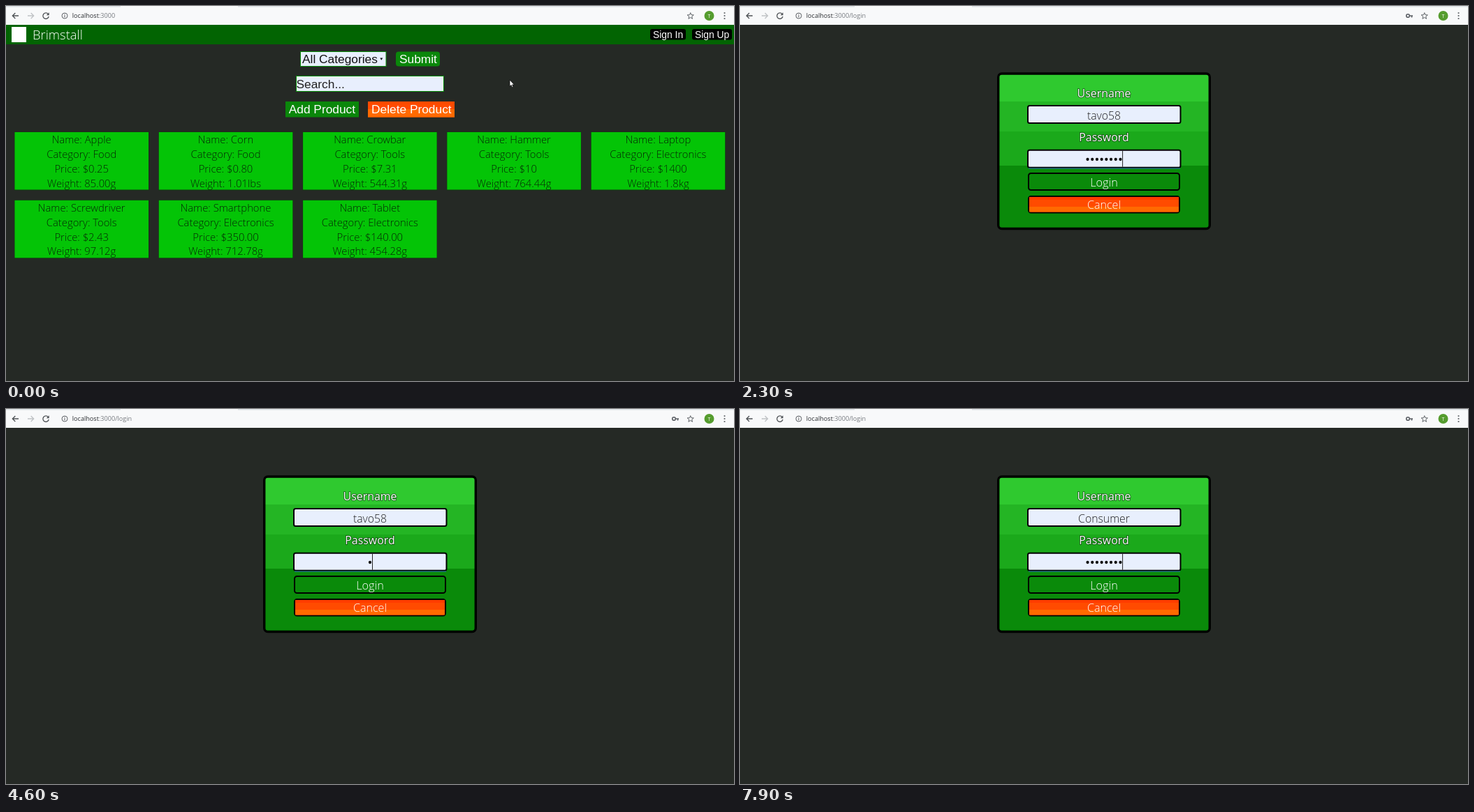
These frames come from a looping animation (1042 by 538 pixels, 8000 ms). An HTML page:

```html
<!DOCTYPE html>
<html lang="en">
<head>
<meta charset="utf-8">
<title>Store login</title>
<style>
  html, body { margin: 0; width: 100%; height: 100%; overflow: hidden; background: #252925; }
  svg { display: block; width: 1042px; height: 538px; }
  text { font-family: "Open Sans", "Noto Sans", sans-serif; white-space: pre; }
  .light { font-weight: 300; }
  .arial { font-family: "Liberation Sans", Arial, sans-serif; }
  .label { stroke: #000; stroke-opacity: .55; stroke-width: 1.6; paint-order: stroke; }
</style>
</head>
<body>
<svg id="stage" viewBox="0 0 1042 538"></svg>
<script>
const LOOP = 8000, STEP = 100;
const USER = "tavo58", BUYER = "Consumer", USERS = [USER, BUYER, "fakename"];
const BLUE = "#e8effd", WHITE = "#f9fafe";

const rect = (x, y, w, h, fill, more = "") =>
  `<rect x="${x}" y="${y}" width="${w}" height="${h}" fill="${fill}" ${more}/>`;
const text = (x, y, size, fill, str, more = "") =>
  `<text x="${x}" y="${y}" font-size="${size}" fill="${fill}" ${more}>${str}</text>`;
const line = (d, color, width, more = "") =>
  `<path d="${d}" fill="none" stroke="${color}" stroke-width="${width}" ${more}/>`;
const disc = (x, y, r, fill) => `<circle cx="${x}" cy="${y}" r="${r}" fill="${fill}"/>`;
const group = (id, body, more = "") => `<g id="${id}" ${more}>${body}</g>`;
const MID = 'text-anchor="middle"';
const LIGHT = 'class="light" text-anchor="middle"';
const ARIAL = 'class="arial"';

function toolbar() {
  const gray = "#5f6368";
  const star = Array.from({ length: 10 }, (_, i) => {
    const a = i * Math.PI / 5 - Math.PI / 2, r = i % 2 ? 2.1 : 4.8;
    return `${(979.7 + r * Math.cos(a)).toFixed(1)},${(14.4 + r * Math.sin(a)).toFixed(1)}`;
  }).join(" ");
  return rect(0, 0, 1042, 27, "#f8f9fa") +
    rect(0, 0, 164, 1.5, "#dee1e6") + rect(332, 0, 710, 1.5, "#dee1e6") +
    line("M18 14H9.5M13.3 10L9.3 14L13.3 18", "#4f5357", 1.3) +
    line("M31 14H39.5M35.7 10L39.7 14L35.7 18", "#bfc2c5", 1.3) +
    group("reload", line("M60.4 11.5A4.2 4.2 0 1 0 61.2 15", "#4f5357", 1.3) +
      `<path d="M61.7 9.3V13.2H57.8Z" fill="#4f5357"/>`) +
    group("stop", line("M53.2 10.2L60.8 17.8M60.8 10.2L53.2 17.8", "#4f5357", 1.3)) +
    `<circle cx="84" cy="14" r="4" fill="none" stroke="${gray}"/>` +
    line("M84 13.3V16.3M84 11.4V12.5", gray, 1.1) +
    `<text x="94.8" y="17.2" font-size="9.1" fill="#2b2e32">localhost<tspan fill="#75797e">:3000<tspan id="path"></tspan></tspan></text>` +
    group("key", `<circle cx="956" cy="14" r="2.3" fill="none" stroke="${gray}" stroke-width="1.6"/>` +
      line("M958 14H963M961.5 14V16.4", gray, 1.7)) +
    `<polygon points="${star}" fill="none" stroke="${gray}" stroke-width="1"/>` +
    disc(1006.5, 14, 7, "#559c2e") + text(1006.5, 16.6, 7, "#fff", "T", MID) +
    [10, 14, 18].map(y => disc(1028.5, y, 1.1, gray)).join("");
}

const PRODUCTS = [
  ["Apple", "Food", "$0.25", "85.00g"], ["Corn", "Food", "$0.80", "1.01lbs"],
  ["Crowbar", "Tools", "$7.31", "544.31g"], ["Hammer", "Tools", "$10", "764.44g"],
  ["Laptop", "Electronics", "$1400", "1.8kg"], ["Screwdriver", "Tools", "$2.43", "97.12g"],
  ["Smartphone", "Electronics", "$350.00", "712.78g"], ["Tablet", "Electronics", "$140.00", "454.28g"]
];

function card(values, i) {
  const x = 12.5 + (i % 5) * 206.3, y = 181 + Math.floor(i / 5) * 97.8;
  const rows = ["Name", "Category", "Price", "Weight"].map((key, k) =>
    text(x + 95.7, y + 16.4 + k * 20.75, 14.8, "#062606", `${key}: ${values[k]}`, LIGHT));
  return rect(x - .5, y - .5, 192.5, 84, "#123a12") + rect(x, y, 191.5, 82.5, "#04c406") + rows.join("");
}

function home() {
  return rect(0, 27, 1042, 28, "#026402") +
    rect(8, 30, 21, 22, "#fff") +
    text(38, 47.8, 18.4, "#fff", "Brimstall", 'class="light"') +
    rect(922, 33, 51, 15.5, "#000", 'rx="3"') + text(926, 45.6, 13.87, "#fff", "Sign In", ARIAL) +
    rect(982, 33, 57, 15.5, "#000", 'rx="3"') + text(986, 45.6, 13.87, "#fff", "Sign Up", ARIAL) +
    rect(921.5, 32, 52, 16.5, "none", 'id="signFocus" stroke="#4a87c8" rx="1"') +
    rect(421.5, 65.5, 122.5, 21, BLUE, 'class="homeField" stroke="#0b8f0b"') +
    text(424, 82, 17.33, "#111", "All Categories", ARIAL) +
    `<path d="M535.3 74.5h4l-2 3.2z" fill="#111"/>` +
    rect(558, 65.5, 63, 21, "#0a870a", 'rx="4"') + text(563, 82, 17.33, "#fff", "Submit", ARIAL) +
    rect(415.5, 100.5, 211, 22, BLUE, 'class="homeField" stroke="#0b8f0b"') +
    text(415.5, 117.8, 17.33, "#222", "Search...", ARIAL) +
    rect(400, 137, 105, 22.5, "#0a870a") + text(404.7, 154, 17.33, "#fff", "Add Product", ARIAL) +
    rect(518, 137, 124, 22.5, "#ff4b00") + rect(518, 148, 124, 11.5, "#ff6a00") +
    text(523, 154, 17.33, "#fff", "Delete Product", ARIAL) +
    PRODUCTS.map(card).join("");
}

function login() {
  const bands = [[98, 39, "#2fc92f"], [137, 43, "#24b524"], [180, 49, "#1ba91b"], [229, 90, "#0a8a0a"]];
  const field = y => rect(412, y, 218.5, 25, BLUE, 'class="field" stroke="#000" stroke-width="2" rx="2.5"');
  const border = 'stroke="#000" stroke-width="2" rx="3.5"';
  return bands.map(([y, h, c]) => rect(370, y, 302, h, c)).join("") +
    rect(369.7, 97, 302.6, 222.5, "none", 'stroke="#000" stroke-width="3.4" rx="5"') +
    text(521, 130.6, 15.9, "#fff", "Username", `class="label" ${MID}`) + field(143) +
    text(521, 162.6, 15.8, "#222", "", `id="user" ${LIGHT}`) +
    text(521, 194, 15.9, "#fff", "Password", `class="label" ${MID}`) + field(206.7) +
    line("M413 233H630", "#2f6fc0", 1, 'id="passFocus"') +
    `<g id="dots"></g>` +
    rect(521, 144, 1, 23, "#222", 'id="caret"') +
    rect(413, 240, 216, 24, "#0a8a0a", border) + text(521, 258.8, 16.3, "#fff", "Login", LIGHT) +
    rect(412, 239, 218, 26, "none", 'id="loginFocus" stroke="#2a7fc4" rx="3"') +
    rect(413, 273, 216, 23.5, "#ff4b00", border) + rect(414, 274, 214, 4, "#ff3c00") +
    rect(414, 288, 214, 7.5, "#ff6a00") + text(521, 290.8, 16.1, "#fff", "Cancel", LIGHT);
}

function menu() {
  return rect(409.5, 169, 223, 87, "#000", 'opacity=".22" rx="3"') +
    rect(410.5, 168.5, 221, 85, "#f9fafb", 'rx="2"') +
    rect(410.5, 174, 221, 25, "#e8eaed", 'id="menuHit"') +
    USERS.map((name, i) => text(418.7, 189.5 + i * 24.5, 8.35, "#202124", name, 'font-weight="600"')).join("");
}

function dialog() {
  return rect(367.5, 25, 307, 90, "#000", 'opacity=".25" rx="3"') +
    rect(369, 25, 304, 88.5, "#f8fafd", 'rx="2"') +
    text(379, 48, 9.65, "#2b2e32", "localhost:3000 says") +
    text(379, 67, 8.3, "#6b6f74", "Username or Password is incorrect") +
    rect(618.5, 81, 44.5, 22.5, "#7ba3ea", 'rx="2.5"') +
    text(640.5, 95, 8.6, "#fff", "OK", `font-weight="600" ${MID}`);
}

const arrow = `<path d="M0 0V9.3L2.1 7.5L3.5 10.7L5 10L3.6 6.9H6.4Z" fill="#fff" stroke="#000" stroke-width=".7"/>`;
const hand = `<path d="M-.8 .5Q0 -.5 .8 .5V4L4.6 5Q5.4 5.4 5.2 6.6L4.4 11H-.6L-3.4 6.8Q-3 5.6 -.8 7Z" fill="#fff" stroke="#000" stroke-width=".7"/>`;

const stage = document.getElementById("stage");
stage.innerHTML = rect(0, 0, 1042, 538, "#252925") + group("home", home()) + group("login", login()) +
  group("menu", menu()) + toolbar() + group("dialog", dialog()) +
  group("pointer", group("arrow", arrow) + group("hand", hand));

const el = id => document.getElementById(id);
const show = (id, on) => el(id).setAttribute("display", on ? "inline" : "none");
const within = (t, ...spans) => spans.some(([a, b]) => t >= a && t < b);
const tint = (cls, color) => stage.querySelectorAll(cls).forEach(n => n.setAttribute("fill", color));

// Each path is a run of [time, x, y]; the pointer is hidden outside them.
const PATHS = [
  [[0, 721, 106], [100, 721, 106], [500, 940, 41], [800, 940, 41]],
  [[2600, 940, 41], [3500, 940, 41]],
  [[4700, 596, 251], [5000, 596, 251], [5400, 645.5, 88.5], [5600, 645.5, 88.5], [6000, 560, 154], [6300, 560, 154]]
];

function pointerAt(t) {
  const path = PATHS.find(p => t >= p[0][0] && t < p[p.length - 1][0]);
  if (!path) return null;
  const i = path.findIndex(p => p[0] > t);
  const [t0, x0, y0] = path[i - 1], [t1, x1, y1] = path[i];
  const u = (t - t0) / (t1 - t0), k = u * u * (3 - 2 * u);
  return [x0 + (x1 - x0) * k, y0 + (y1 - y0) * k];
}

const typed = (t, start, end, count) =>
  Math.max(0, Math.min(count, Math.round((t - start) / (end - start) * count)));

function username(t) {
  if (within(t, [1300, 2500], [4100, 6500])) return USER;
  return t >= 6500 ? BUYER.slice(0, typed(t, 6400, 7200, 8)) : "";
}

function passwordLength(t) {
  if (t < 2500) return typed(t, 1500, 2200, 8);
  if (t < 6500) return t >= 4500 ? 1 : 0;
  return typed(t, 7300, 7900, 8);
}

function draw(t) {
  const atHome = within(t, [0, 800], [2500, 3500]);
  const loading = within(t, [600, 900], [2400, 2500], [3200, 3600], [4900, 5000], [5600, 5700]);
  const inPassword = within(t, [1500, 2500], [4300, 4700], [7300, LOOP]);
  const inUsername = within(t, [800, 1500], [3500, 4300], [6000, 7300]);

  show("home", atHome);
  show("login", !atHome);
  show("signFocus", within(t, [500, 800], [3200, 3500]));
  show("menu", within(t, [1000, 1300], [3800, 4100]));
  show("menuHit", within(t, [1200, 1300], [4000, 4100]));
  show("dialog", within(t, [5000, 5600]));
  show("loginFocus", within(t, [4800, 6000]));
  show("passFocus", inPassword);
  show("reload", !loading);
  show("stop", loading);
  show("key", within(t, [1300, 2500], [4100, 6500], [7200, LOOP]));
  el("path").textContent = within(t, [0, 600], [2500, 3200]) ? "" : "/login";
  tint(".homeField", t < 800 ? BLUE : "#f5f7fd");
  tint(".field", within(t, [4700, 6500]) ? WHITE : BLUE);

  const name = username(t), dots = passwordLength(t);
  el("user").textContent = name;
  el("dots").innerHTML = Array.from({ length: dots }, (_, i) =>
    disc(521 + (i - (dots - 1) / 2) * 6.7, 220, 2.15, "#111")).join("");
  show("caret", inPassword || inUsername);
  const caretX = inPassword ? 520.7 + dots * 3.3 : 520.7 + (name ? el("user").getComputedTextLength() / 2 : 0);
  el("caret").setAttribute("x", caretX);
  el("caret").setAttribute("y", inPassword ? 207.7 : 144);

  const pos = pointerAt(t);
  show("pointer", pos);
  if (pos) {
    const overButton = atHome && pos[0] > 922 && pos[1] < 49;
    el("pointer").setAttribute("transform", `translate(${pos})`);
    show("arrow", !overButton);
    show("hand", overButton);
  }
}

let last = -1;
const begin = performance.now();
function tick() {
  const t = Math.floor(((performance.now() - begin) % LOOP) / STEP) * STEP;
  if (t !== last) draw(last = t);
  requestAnimationFrame(tick);
}
tick();
</script>
</body>
</html>
```
